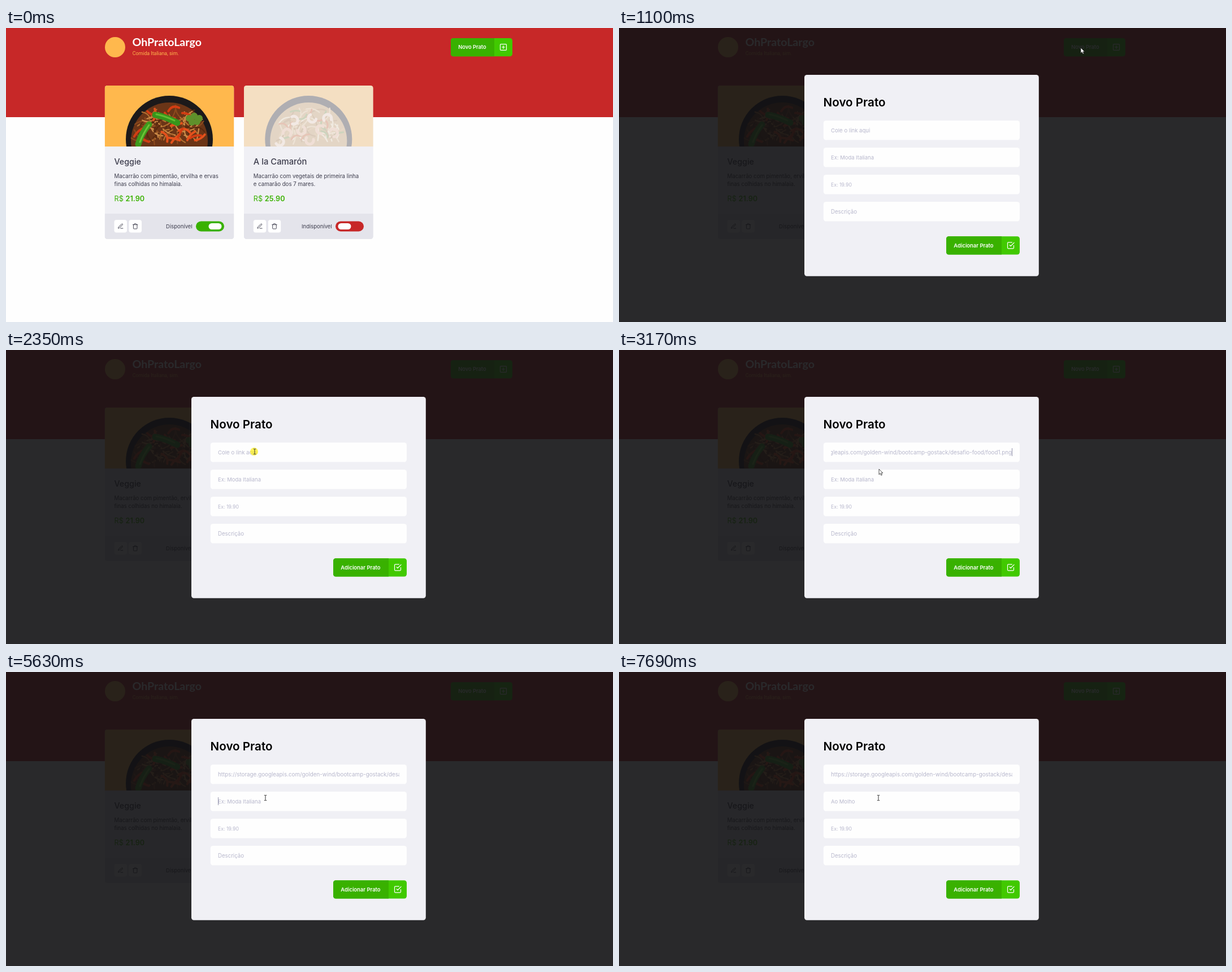
Write an HTML page that moves like this. It is 1074 px wide and 521 px high and loops after 8000 ms.

```html
<!DOCTYPE html>
<html lang="pt">
<head>
<meta charset="utf-8">
<title>Novo Prato</title>
<style>
html, body { margin: 0; width: 100%; height: 100%; overflow: hidden; background: #fefefe; }
svg { display: block; width: 100vw; height: 100vh; }
text { font-family: Inter, "Open Sans", sans-serif; white-space: pre; }
.icon { fill: none; stroke-linecap: round; stroke-linejoin: round; stroke-width: 2; }
</style>
</head>
<body>
<svg id="stage" viewBox="0 0 1074 521" xmlns="http://www.w3.org/2000/svg"></svg>
<script>
const LOOP = 8000;
const RED = '#c72828', GREEN = '#39b100', LIME = '#41c900', INK = '#3d3d4d', PANEL = '#f0f0f5', MUTED = '#b7b7cc';
const URL_TEXT = 'https://storage.googleapis.com/golden-wind/bootcamp-gostack/desafio-food/food1.png';
const FIELD_X = 375, FIELD_TOPS = [164, 212, 260, 308];

const ICONS = {
  pen: 'M12 20h9M16.5 3.5a2.12 2.12 0 0 1 3 3L7 19l-4 1 1-4z',
  bin: 'M3 6h18M19 6v14a2 2 0 0 1-2 2H7a2 2 0 0 1-2-2V6m3 0V4a2 2 0 0 1 2-2h4a2 2 0 0 1 2 2v2',
  plus: 'M5 3h14a2 2 0 0 1 2 2v14a2 2 0 0 1-2 2H5a2 2 0 0 1-2-2V5a2 2 0 0 1 2-2zM12 8v8M8 12h8',
  check: 'M9 11l3 3L22 4M21 12v7a2 2 0 0 1-2 2H5a2 2 0 0 1-2-2V5a2 2 0 0 1 2-2h11'
};

const rect = (x, y, w, h, fill, r = 0) =>
  `<rect x="${x}" y="${y}" width="${w}" height="${h}" rx="${r}" fill="${fill}"/>`;
const text = (x, y, size, fill, str, extra = '') =>
  `<text x="${x}" y="${y}" font-size="${size}" fill="${fill}" ${extra}>${str}</text>`;
const icon = (name, cx, cy, size, color) =>
  `<path class="icon" d="${ICONS[name]}" stroke="${color}" transform="translate(${cx - size / 2} ${cy - size / 2}) scale(${size / 24})"/>`;
const line = (d, color, width) =>
  `<path d="${d}" fill="none" stroke="${color}" stroke-width="${width}" stroke-linecap="round"/>`;

function random(seed) {
  return () => (seed = seed * 16807 % 2147483647) / 2147483647;
}

// Short curved strokes scattered inside the plate, around its centre.
function strands(rnd, count, colors, width, len) {
  let out = '';
  for (let i = 0; i < count; i++) {
    const a = Math.PI * (1 + rnd()), r = 57 * Math.sqrt(rnd());
    const x = r * Math.cos(a), y = r * Math.sin(a), dir = rnd() * 6.28;
    const dx = len * Math.cos(dir), dy = len * Math.sin(dir), bend = rnd() - .5;
    out += line(`M${(x - dx / 2).toFixed(1)} ${(y - dy / 2).toFixed(1)}q${(dx / 2 - dy * bend).toFixed(1)} ${(dy / 2 + dx * bend).toFixed(1)} ${dx.toFixed(1)} ${dy.toFixed(1)}`,
      colors[i % colors.length], width);
  }
  return out;
}

function veggieDish() {
  const rnd = random(41);
  const leaves = [[35, -37], [44, -41], [40, -30], [49, -31], [53, -37]];
  return '<circle r="77" fill="#1c191a"/><circle cy="3" r="68" fill="#6b3517"/>' +
    strands(rnd, 60, ['#b4702f', '#8d4a1d', '#cd8b47', '#59290f'], 2.2, 24) +
    strands(rnd, 16, ['#e4511c', '#d33d12'], 4, 20) +
    line('M-55 9Q-50-10-36-26', '#3f9a1d', 11) + line('M-52 5Q-46-11-36-25', '#6cc437', 3) +
    line('M-25-43Q-9-41 14-29', '#37951b', 11) + line('M-23-44Q-10-42 9-33', '#62bd32', 3) +
    leaves.map(([x, y]) => `<circle cx="${x}" cy="${y}" r="6" fill="#5f912b"/>`).join('');
}

function prawnDish() {
  const rnd = random(97);
  const prawns = [[-38, -12], [-25, -34], [-12, -15], [6, -36], [20, -17], [33, -38], [45, -12], [-50, 5], [2, 3]];
  return '<circle r="77" fill="#1c191a"/><circle cy="3" r="68" fill="#c79a58"/>' +
    strands(rnd, 52, ['#e6c48c', '#d4a35c', '#f1dcb0', '#a97838'], 2.4, 24) +
    strands(rnd, 14, ['#d0652a', '#7f9440'], 3, 16) +
    prawns.map(([x, y], i) =>
      `<path d="M-7 2A7 7 0 1 1 5 6" transform="translate(${x} ${y}) rotate(${i * 67})" fill="none" stroke="${i % 2 ? '#f7d9bd' : '#f0b98f'}" stroke-width="5" stroke-linecap="round"/>`).join('');
}

function button(x, y, w, split, label, size, name) {
  return rect(x, y, w, 32.2, LIME, 4.5) +
    `<path d="M${split} ${y}H${x + 4.5}a4.5 4.5 0 0 0-4.5 4.5v23.2a4.5 4.5 0 0 0 4.5 4.5H${split}z" fill="${GREEN}"/>` +
    text(x + 13.3, y + 19.4, size, '#fff', label, 'font-weight="600"') +
    icon(name, x + w - 16, y + 16, 14.6, '#fff');
}

function card(x, dish, name, nameSize, desc, price, on) {
  const tx = x + 16.8, sw = on ? x + 161.3 : x + 162;
  return `<g clip-path="url(#card${x})">` +
    rect(x, 102, 229, 272, PANEL) +
    `<g opacity="${on ? 1 : .3}">${rect(x, 102, 229, 108, '#ffb84d')}` +
    `<g clip-path="url(#photo${x})"><g transform="translate(${x + 114.3} 197)">${dish}</g></g></g>` +
    rect(x, 329, 229, 45, '#e4e4eb') + '</g>' +
    text(tx, 242, nameSize, INK, name, 'font-weight="500"') +
    desc.map((s, i) => text(tx, 266 + 14 * i, 9.68, INK, s)).join('') +
    text(tx, 307, 12.7, GREEN, 'R$') +
    text(tx + 20, 307, 12.7, GREEN, price, 'font-weight="600"') +
    [['pen', 0], ['bin', 26]].map(([n, dx]) =>
      rect(tx + dx, 340, 22.5, 22.5, '#fff', 4) + icon(n, tx + dx + 11.2, 351.3, 11.2, INK)).join('') +
    text(sw - 6.3, 355, 9.5, INK, on ? 'Disponível' : 'Indisponível', 'text-anchor="end"') +
    rect(sw, 342.5, 50, 18, on ? GREEN : RED, 9) +
    rect(sw + (on ? 22.5 : 4.5), 346, 23, 11, '#fff', 5.5);
}

const clip = (id, x, y, w, h, r = 0) => `<clipPath id="${id}">${rect(x, y, w, h, '#000', r)}</clipPath>`;

const page = rect(0, 0, 1074, 521, '#fefefe') + rect(0, 0, 1074, 158, RED) +
  '<circle cx="193" cy="34" r="18" fill="#ffb84d"/>' +
  text(223.5, 32, 19.6, '#fff', 'OhPratoLargo', 'font-weight="700" style="font-family:Lato,sans-serif"') +
  text(223.8, 47.8, 8.8, '#ffb84d', 'Comida Italiana, sim.', 'style="font-family:Roboto,sans-serif"') +
  button(787, 18, 109, 864, 'Novo Prato', 9.25, 'plus') +
  card(174.7, veggieDish(), 'Veggie', 14.3,
    ['Macarrão com pimentão, ervilha e ervas', 'finas colhidas no himalaia.'], '21.90', true) +
  card(421, prawnDish(), 'A la Camarón', 14.8,
    ['Macarrão com vegetais de primeira linha', 'e camarão dos 7 mares.'], '25.90', false);

const modal = rect(0, 0, 1074, 521, 'rgba(18,18,20,.9)') +
  rect(328, 83, 414.8, 356.7, PANEL, 4.5) +
  text(361.6, 138.6, 20.6, '#000', 'Novo Prato', 'font-weight="600"') +
  FIELD_TOPS.map(y => rect(361.8, y, 347.2, 34.5, '#fefefe', 4.5)).join('') +
  '<g clip-path="url(#field)">' + text(FIELD_X, 185, 9.6, MUTED, '', 'id="link"') + '</g>' +
  text(FIELD_X, 233, 9.45, MUTED, '', 'id="dish"') +
  text(FIELD_X, 281, 8.7, MUTED, 'Ex: 19.90') +
  text(FIELD_X, 329, 9.65, MUTED, 'Descrição') +
  button(579, 369.3, 130, 677, 'Adicionar Prato', 9.45, 'check') +
  '<rect id="caret" width="1" height="14" fill="#9494ac"/>';

const cursors = '<circle id="click" r="7" fill="#fe0" fill-opacity=".65"/><g id="cursor">' +
  '<path id="arrow" d="M0 0v9.6l2.2-2 1.6 3.4 1.7-.8-1.6-3.3h3z" fill="#fff" stroke="#222" stroke-width=".8"/>' +
  '<path id="beam" d="M-2.2-4.6H-.6L0-4.2.6-4.6H2.2M0-4.2V4.2M-2.2 4.6H-.6L0 4.2.6 4.6H2.2" fill="none" stroke="#333"/>' +
  '<path id="hand" d="M-1 .4Q0-.6 1 .4V4.4L4.2 5Q5.4 5.4 5.3 6.8L4.6 10V11.6H-.6Q-2-8.6-.6 11.6L-3.6 7.4Q-3.4 6-2.2 6.6L-1 7.6z" fill="#fff" stroke="#222" stroke-width=".8"/></g>';

document.getElementById('stage').innerHTML = '<defs>' +
  [174.7, 421].map(x => clip('card' + x, x, 102, 228.6, 272, 4.5) + clip('photo' + x, x, 102, 229, 108)).join('') +
  clip('field', FIELD_X, 164, 321, 35) + '</defs>' + page + `<g id="modal">${modal}</g>` + cursors;

const el = {};
for (const node of document.querySelectorAll('[id]')) el[node.id] = node;
el.hand.setAttribute('d', 'M-1 .4Q0-.6 1 .4V4.2L4.2 5Q5.4 5.4 5.3 6.8L4.6 10V11.6H-.6L-3.6 7.4Q-3.4 6-2.2 6.6L-1 7.6z');

const PATH = [
  [130, 1015, 498], [340, 965, 350], [550, 880, 150], [690, 826, 62], [830, 815, 38], [900, 819, 35.5],
  [1099, 819, 35.5], [1100, 817, 35], [1170, 817, 35], [1310, 735, 85], [1450, 600, 150], [1590, 490, 190],
  [1730, 440, 203], [1900, 439, 196], [2200, 440, 180], [2820, 440, 180], [2960, 448, 193],
  [3170, 460, 211], [3310, 460, 219], [3440, 459, 223]
];
const CLICKS = [[970, 1100, 818, 34], [2350, 2490, 439, 180], [3510, 3580, 458, 222.5]];
const KEYS = [5890, 6090, 6290, 6490, 6760, 6960, 7060, 7160];
const TYPED = 'Ao Molho';
const OPEN = 1100, FOCUS_LINK = 2420, PASTE = 2750, FOCUS_DISH = 3510;

function pointer(t) {
  const i = PATH.findIndex(p => p[0] > t);
  if (i < 0) return PATH[PATH.length - 1].slice(1);
  if (i === 0) return PATH[0].slice(1);
  const [t0, x0, y0] = PATH[i - 1], [t1, x1, y1] = PATH[i], k = (t - t0) / (t1 - t0);
  return [x0 + (x1 - x0) * k, y0 + (y1 - y0) * k];
}

const show = (node, on) => node.setAttribute('visibility', on ? 'inherit' : 'hidden');

function setText(node, str) {
  if (node.textContent !== str) node.textContent = str;
}

function drawForm(t) {
  const pasted = t >= PASTE, scrolled = pasted && t < FOCUS_DISH;
  setText(el.link, pasted ? URL_TEXT : 'Cole o link aqui');
  el.link.setAttribute('font-size', pasted ? 9.8 : 9.6);
  el.link.setAttribute('text-anchor', scrolled ? 'end' : 'start');
  el.link.setAttribute('x', scrolled ? 695 : FIELD_X);

  const count = KEYS.filter(k => t >= k).length;
  setText(el.dish, count ? TYPED.slice(0, count) : 'Ex: Moda Italiana');

  // The caret restarts its blink at every focus, paste and key press.
  const since = t - Math.max(...[FOCUS_LINK, PASTE, FOCUS_DISH, ...KEYS].filter(k => t >= k));
  show(el.caret, t >= FOCUS_LINK && Math.floor(since / 530) % 2 === 0);
  const x = scrolled ? 695 : FIELD_X + (count ? el.dish.getComputedTextLength() : 0);
  el.caret.setAttribute('x', Math.round(x));
  el.caret.setAttribute('y', t >= FOCUS_DISH ? 222 : 174);
}

function draw(t) {
  const open = t >= OPEN, [x, y] = pointer(t);
  show(el.modal, open);
  if (open) drawForm(t);
  else show(el.caret, false);

  const inField = open && x > 362 && x < 709 && FIELD_TOPS.some(top => y >= top && y <= top + 34.5);
  const onButton = !open && x > 787 && x < 896 && y < 50;
  show(el.cursor, t >= 130);
  show(el.beam, inField);
  show(el.hand, onButton);
  show(el.arrow, !inField && !onButton);
  el.cursor.setAttribute('transform', `translate(${x} ${y})`);

  const hit = CLICKS.find(c => t >= c[0] && t < c[1]);
  show(el.click, !!hit);
  if (hit) {
    el.click.setAttribute('cx', hit[2]);
    el.click.setAttribute('cy', hit[3]);
  }
}

const start = performance.now();
function tick() {
  draw((performance.now() - start) % LOOP);
  requestAnimationFrame(tick);
}
tick();
</script>
</body>
</html>
```
